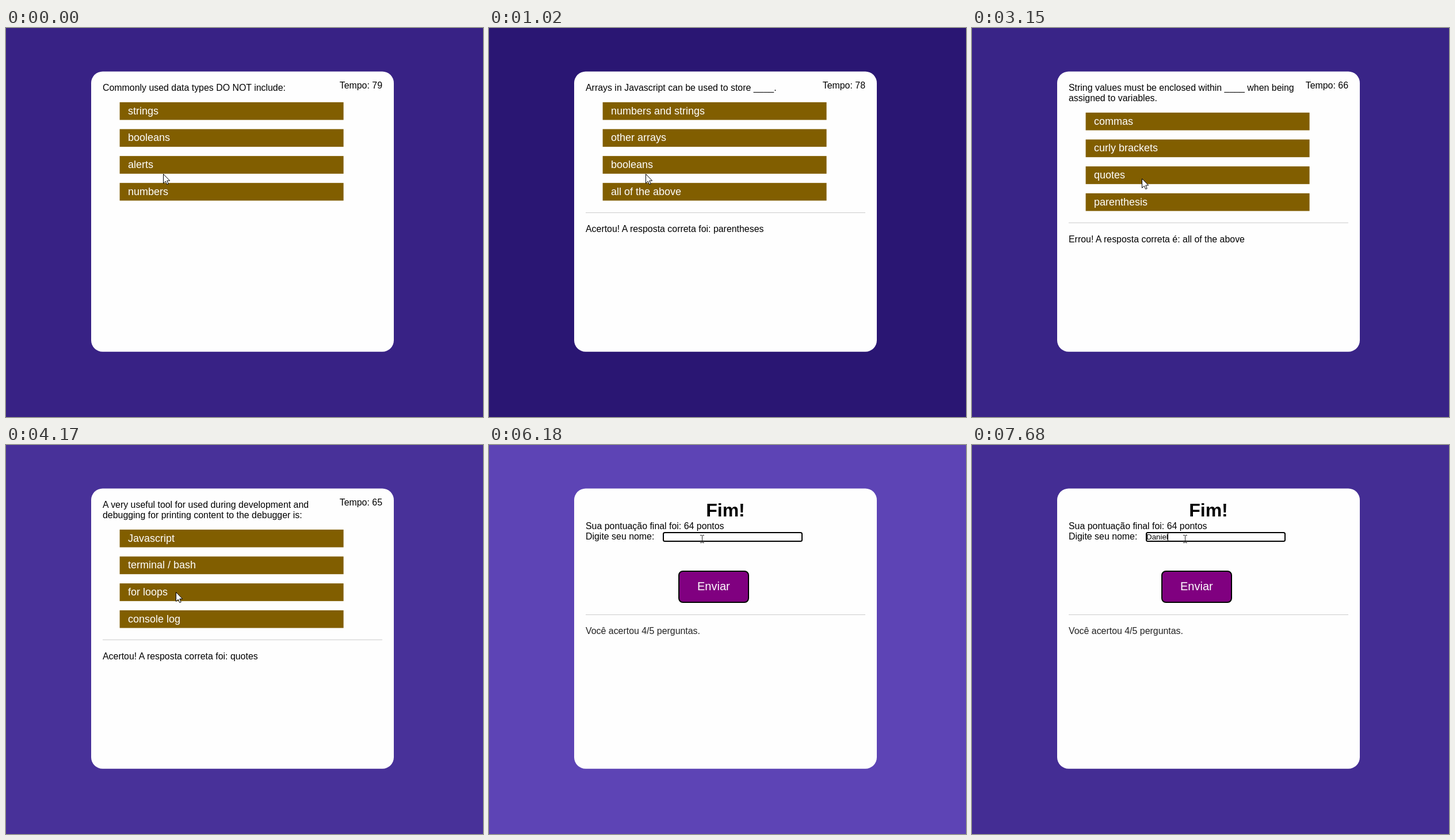
Write an HTML page that moves like this. It is 829 px wide and 675 px high and loops after 8 s.

```html
<!DOCTYPE html>
<html lang="pt">
<head>
<meta charset="utf-8">
<style>
  html, body { margin: 0; width: 100%; height: 100%; overflow: hidden; }
  svg { display: block; width: 829px; height: 675px; }
  text { font-family: Arial, "Liberation Sans", sans-serif; font-size: 15.92px; }
</style>
</head>
<body>
<svg viewBox="0 0 829 675">
  <rect id="back" width="829" height="675"/>
  <rect x="148" y="75.5" width="526" height="486.3" rx="20" fill="#fefefe"/>
  <g id="scene"></g>
  <path id="arrow" d="M.5 .5V16.5L4.2 13 6.8 18.5 9.2 17.5 6.8 12H11.7Z" fill="#fff" stroke="#000"/>
  <path id="beam" d="M367 156.5H370M371 156.5H374M370.5 157V169M367 169.5H370M371 169.5H374" fill="none" stroke="#222"/>
</svg>
<script>
const LOOP = 8000, END = 5040, FOCUS = 6180, TYPE = 6930;
const GLIDE = 500, KEY = 150, PENALTY = 2640;
const $ = id => document.getElementById(id);
const right = 'Acertou! A resposta correta foi: ';

const questions = [
  { at: 0, ask: ['Commonly used data types DO NOT include:'],
    options: ['strings', 'booleans', 'alerts', 'numbers'], note: '' },
  { at: 270, ask: ['The condition in an if / else statement is enclosed', 'within ____.'],
    options: ['quotes', 'curly brackets', 'parentheses', 'square brackets'], note: right + 'alerts' },
  { at: 1020, ask: ['Arrays in Javascript can be used to store ____.'],
    options: ['numbers and strings', 'other arrays', 'booleans', 'all of the above'], note: right + 'parentheses' },
  { at: 1890, ask: ['String values must be enclosed within ____ when being', 'assigned to variables.'],
    options: ['commas', 'curly brackets', 'quotes', 'parenthesis'], note: 'Errou! A resposta correta é: all of the above' },
  { at: 3540, ask: ['A very useful tool for used during development and', 'debugging for printing content to the debugger is:'],
    options: ['Javascript', 'terminal / bash', 'for loops', 'console log'], note: right + 'quotes' }
];

// [time, brightness] of the backdrop
const glow = [[0, .3], [1100, .02], [1900, 0], [5700, 1], [FOCUS, 1], [LOOP, .42]];

// [arrival time, x, y]: the pointer rests, then glides to each stop
const stops = [[0, 273, 253], [120, 269, 237], [1020, 272, 253], [1890, 294, 239],
  [2640, 294, 295], [3270, 295, 255], [4890, 299, 297], [5520, 303, 301], [6030, 358, 157]];

const mix = (a, b, u) => a + (b - a) * u;
const ease = u => u * u * (3 - 2 * u);

function backdrop(t) {
  const i = glow.findIndex(g => g[0] > t);
  const [t0, a] = glow[i - 1], [t1, b] = glow[i];
  const k = mix(a, b, (t - t0) / (t1 - t0));
  return `rgb(${mix(40, 93, k)},${mix(20, 68, k)},${mix(112, 181, k)})`;
}

function pointer(t) {
  const i = stops.findIndex(s => s[0] > t);
  if (i < 0) return stops.at(-1).slice(1);
  const [t0, x0, y0] = stops[i - 1], [t1, x1, y1] = stops[i];
  const from = Math.max(t0, t1 - GLIDE);
  const u = ease(Math.max(0, (t - from) / (t1 - from)));
  return [mix(x0, x1, u), mix(y0, y1, u)].map(Math.round);
}

const text = (s, x, y, more = '') => `<text x="${x}" y="${y}" ${more}>${s}</text>`;
const box = (x, y, w, h, more) => `<rect x="${x}" y="${y}" width="${w}" height="${h}" ${more}/>`;
const rule = y => box(168, y, 486, 1, 'fill="#ccc"');

function quiz(t) {
  const q = questions.findLast(q => q.at <= t);
  const drop = 18 * (q.ask.length - 1);
  const left = 79 - Math.floor((t + 360) / 1000) - (t < PENALTY ? 0 : 10);
  let out = text('Tempo: ' + left, 654, 105, 'text-anchor="end"');
  q.ask.forEach((s, i) => out += text(s, 168, 109 + 18 * i));
  q.options.forEach((s, i) => {
    const y = 128.8 + drop + i * 46.67;
    out += box(197.6, y, 389, 30.7, 'fill="#815e00"') +
      text(s, 212, Math.round(y + 21), 'fill="#fff" style="font-size:18px"');
  });
  if (q.note) out += rule(drop ? 337.5 : 320) + text(q.note, 168, 354 + drop);
  return out;
}

function finish(t) {
  const name = 'Daniel'.slice(0, Math.max(0, 1 + Math.floor((t - TYPE) / KEY)));
  const edge = t < FOCUS
    ? box(303.5, 152.5, 240, 14, 'fill="#fff" stroke="#767676"')
    : box(303, 152, 241, 15, 'rx="2.5" fill="#fff" stroke="#000" stroke-width="2"');
  return text('Fim!', 411, 124, 'text-anchor="middle" style="font-size:32px;font-weight:bold"') +
    text('Sua pontuação final foi: 64 pontos', 168, 146) +
    text('Digite seu nome:', 168, 164) + edge +
    text(name, 303, 164, 'id="name" style="font-size:13.333px"') +
    box(330, 219, 121, 54, 'rx="7" fill="#800080" stroke="#000" stroke-width="2"') +
    text('Enviar', 362, 252, 'fill="#fff" style="font-size:20px"') +
    rule(294) + text('Você acertou 4/5 perguntas.', 168, 328, 'fill="#222"');
}

let shown = '';
function draw(t) {
  $('back').setAttribute('fill', backdrop(t > FOCUS && t < TYPE ? FOCUS : t));

  const scene = t < END ? quiz(t) : finish(t);
  if (scene !== shown) {
    $('scene').innerHTML = shown = scene;
    if (t >= TYPE) {
      const x = Math.round(303 + $('name').getComputedTextLength());
      $('scene').insertAdjacentHTML('beforeend', box(x - 1, 153, 1, 13, ''));
    }
  }

  $('arrow').setAttribute('transform', `translate(${pointer(t)})`);
  $('arrow').style.display = t < FOCUS ? '' : 'none';
  $('beam').style.display = t < FOCUS ? 'none' : '';
}

const start = performance.now();
function tick() {
  draw((performance.now() - start) % LOOP);
  requestAnimationFrame(tick);
}
tick();
</script>
</body>
</html>
```
